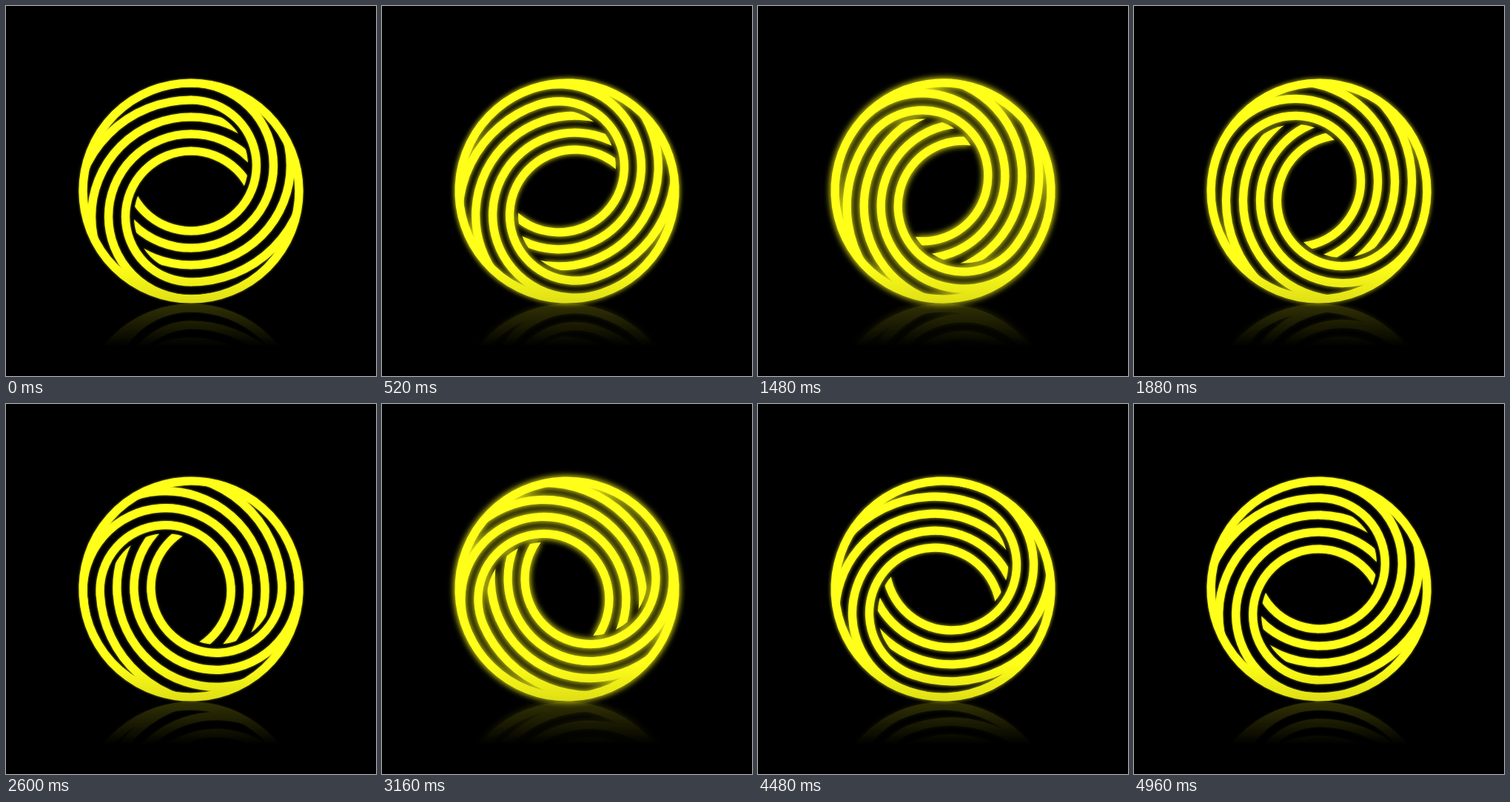
Write an HTML page with a canvas that moves like this. It is 500 by 500 pixels and loops after 5 s.

```html
<!DOCTYPE html>
<html lang="en">
<head>
<meta charset="utf-8">
<title>Rotating ring</title>
<style>
  html, body { margin: 0; width: 100%; height: 100%; overflow: hidden; background: #000; }
  canvas { display: block; }
</style>
</head>
<body>
<canvas id="stage" width="500" height="500"></canvas>
<script>
const SIZE = 500, LOOP = 5000, PULSE = 2500, PEAK = 960;
const STEP = 23, LINE = 11.2, INNER = 88.5, SHIFT = STEP * 1.5, OUTER = 146;
const FLOOR = 402, FADE_END = 460;

const stage = document.getElementById('stage').getContext('2d');
const layer = () => {
  const canvas = document.createElement('canvas');
  canvas.width = canvas.height = SIZE;
  return canvas.getContext('2d');
};
const art = layer(), scene = layer();

function gradient(ctx, y0, y1, from, to) {
  const g = ctx.createLinearGradient(0, y0, 0, y1);
  g.addColorStop(0, `rgba(0,0,0,${from})`);
  g.addColorStop(1, `rgba(0,0,0,${to})`);
  return g;
}
const shade = gradient(scene, 350, FLOOR, 0, 0.13);
const fade = gradient(stage, FLOOR, FADE_END, 0.78, 1);

function circle(y, r) {
  art.beginPath();
  art.arc(0, y, r, 0, Math.PI * 2);
}

function rings(y, count) {
  for (let k = 0; k < count; k++) {
    circle(y, INNER + k * STEP);
    art.stroke();
  }
}

// Right half: the raised stack in front, the lowered stack seen through its opening.
function half() {
  art.save();
  art.beginPath();
  art.rect(-0.5, -200, 200, 400);
  art.clip();
  rings(-SHIFT, 5);
  circle(-SHIFT, INNER - STEP / 2);
  art.clip();
  rings(SHIFT, 3);
  art.restore();
}

function drawArt(angle) {
  art.clearRect(0, 0, SIZE, SIZE);
  art.save();
  art.translate(SIZE / 2, SIZE / 2);
  art.rotate(angle);
  art.strokeStyle = '#ffff19';
  art.lineWidth = LINE;
  circle(0, OUTER);
  art.stroke();
  circle(0, OUTER);
  art.clip();
  half();
  art.rotate(Math.PI);
  half();
  art.restore();
}

function glowAt(t) {
  const p = t % PULSE;
  const phase = p < PEAK ? p / PEAK : (PULSE - p) / (PULSE - PEAK);
  return (1 - Math.cos(Math.PI * phase)) / 2;
}

function drawScene(glow) {
  scene.clearRect(0, 0, SIZE, SIZE);
  scene.save();
  scene.filter = `blur(${1.5 + 4.2 * glow}px)`;
  for (const alpha of [0.6 + 0.4 * glow, 0.5 * glow]) {
    scene.globalAlpha = alpha;
    scene.drawImage(art.canvas, 0, 0);
  }
  scene.restore();
  scene.drawImage(art.canvas, 0, 0);
  scene.save();
  scene.globalCompositeOperation = 'source-atop';
  scene.fillStyle = shade;
  scene.fillRect(0, 350, SIZE, SIZE);
  scene.restore();
}

function frame(now) {
  const t = now % LOOP;
  drawArt(-Math.PI * t / LOOP);
  drawScene(glowAt(t));

  stage.fillStyle = '#000';
  stage.fillRect(0, 0, SIZE, SIZE);
  stage.save();
  stage.translate(0, 2 * FLOOR);
  stage.scale(1, -1);
  stage.drawImage(scene.canvas, 0, 0);
  stage.restore();
  stage.fillRect(0, 0, SIZE, FLOOR);
  stage.fillStyle = fade;
  stage.fillRect(0, FLOOR, SIZE, SIZE);
  stage.drawImage(scene.canvas, 0, 0);
}

const start = performance.now();
function tick() {
  frame(performance.now() - start);
  requestAnimationFrame(tick);
}
tick();
</script>
</body>
</html>
```
